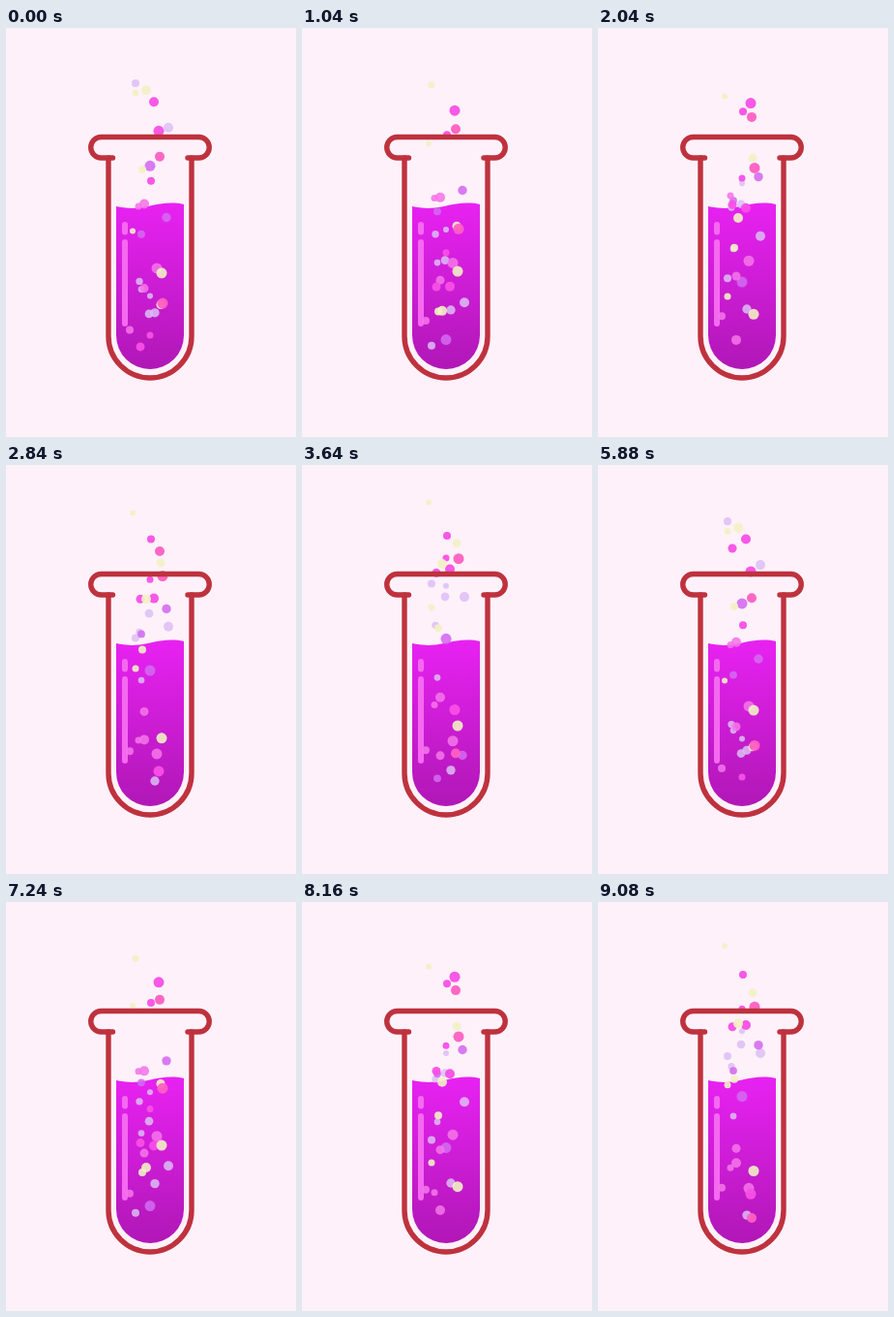
These frames come from a looping animation (300x422 px, 9.16 s). An HTML page:

```html
<!DOCTYPE html>
<html lang="en">
<head>
<meta charset="utf-8">
<title>Bubbling test tube</title>
<style>
html, body { margin: 0; height: 100%; overflow: hidden; background: #fff1fa; }
svg { display: block; width: 100%; height: 100%; }
.line { fill: none; stroke-linecap: round; }
</style>
</head>
<body>
<svg viewBox="0 0 300 422">
  <defs>
    <linearGradient id="liquid" x1="0" y1="0" x2="0" y2="1">
      <stop offset="0" stop-color="#e822f2"/>
      <stop offset="1" stop-color="#b017b6"/>
    </linearGradient>
  </defs>
  <path fill="url(#liquid)" d="M114 184C123 186 134 187 147 184S172 179 184 182V317A35 35 0 0 1 114 317Z"/>
  <path class="line" stroke="#f569f1" stroke-width="6" d="M123 203V210.500M123 221V305"/>
  <g id="bubbles"></g>
  <g class="line" stroke="#be323e" stroke-width="5.400">
    <path d="M106 134V318A43 43 0 0 0 192 318V134"/>
    <path d="M110.500 134H98.500A10.750 10.750 0 0 1 98.500 112.500H199.500A10.750 10.750 0 0 1 199.500 134H188"/>
  </g>
</svg>
<script>
const LOOP = 9160, RISE = 6000;
const DEPTHS = [300, 330];

// Largest bubble first, each next one smaller by step.
// Each bubble: x, highest y, start as a share of the rise
const groups = [
  { fill: '#dcbef5', opacity: .85, size: 5, step: .33, bubbles: [
    [168, 102, .08], [154, 290, .37], [148, 121, .955], [134, 53, .156],
    [138, 162, .807], [140, 219, .684], [149, 116, .88]] },
  { fill: '#d369f0', opacity: .88, size: 5.5, step: .8, bubbles: [
    [149, 141, .112], [166, 147, .6], [140, 174, .547]] },
  { fill: '#f474e8', opacity: .88, size: 5.5, step: .5, bubbles: [
    [156, 240, .425], [143, 174, .272], [143, 254, .6], [128, 294, .7], [137, 173, .355]] },
  { fill: '#f84fe6', opacity: .95, size: 5.5, step: .5, bubbles: [
    [158, 77, .402], [153, 76, .042], [139, 86, .99], [150, 73, .637], [149, 78, .932]] },
  { fill: '#f2f1c4', opacity: .9, size: 5.5, step: .5, bubbles: [
    [161, 251, .24], [145, 64, .045], [160, 65, .924],
    [141, 146, .015], [134, 58, .24], [131, 35, .75]] },
  { fill: '#ff5fc2', opacity: .95, size: 5.5, step: .5, bubbles: [
    [162, 83, .915], [159, 89, .483]] }
];

// cubic-bezier(.25, .1, .25, 1), solved by bisection
function ease(x) {
  let lo = 0, hi = 1, s;
  for (let i = 0; i < 22; i++) {
    s = (lo + hi) / 2;
    if (.75 * s * (1 - s) + s ** 3 < x) lo = s; else hi = s;
  }
  return .3 * s * (1 - s) ** 2 + 3 * s * s * (1 - s) + s ** 3;
}

const layer = document.getElementById('bubbles');
const risers = [];

for (const { fill, opacity, size, step, bubbles } of groups) {
  bubbles.forEach(([cx, top, start], i) => {
    const el = document.createElementNS(layer.namespaceURI, 'circle');
    const attrs = { cx, r: size - step * i, fill, opacity };
    for (const key in attrs) el.setAttribute(key, attrs[key]);
    layer.append(el);
    // Bubbles leave the two depths in turn
    risers.push({ el, top, start, low: DEPTHS[risers.length % 2] });
  });
}

function draw(now) {
  const time = now % LOOP / RISE;
  for (const { el, low, top, start } of risers) {
    const progress = (time - start + 1) % 1;
    el.setAttribute('cy', low + (top - low) * ease(progress));
  }
}

const begin = performance.now();
function tick() {
  draw(performance.now() - begin);
  requestAnimationFrame(tick);
}
tick();
</script>
</body>
</html>
```
